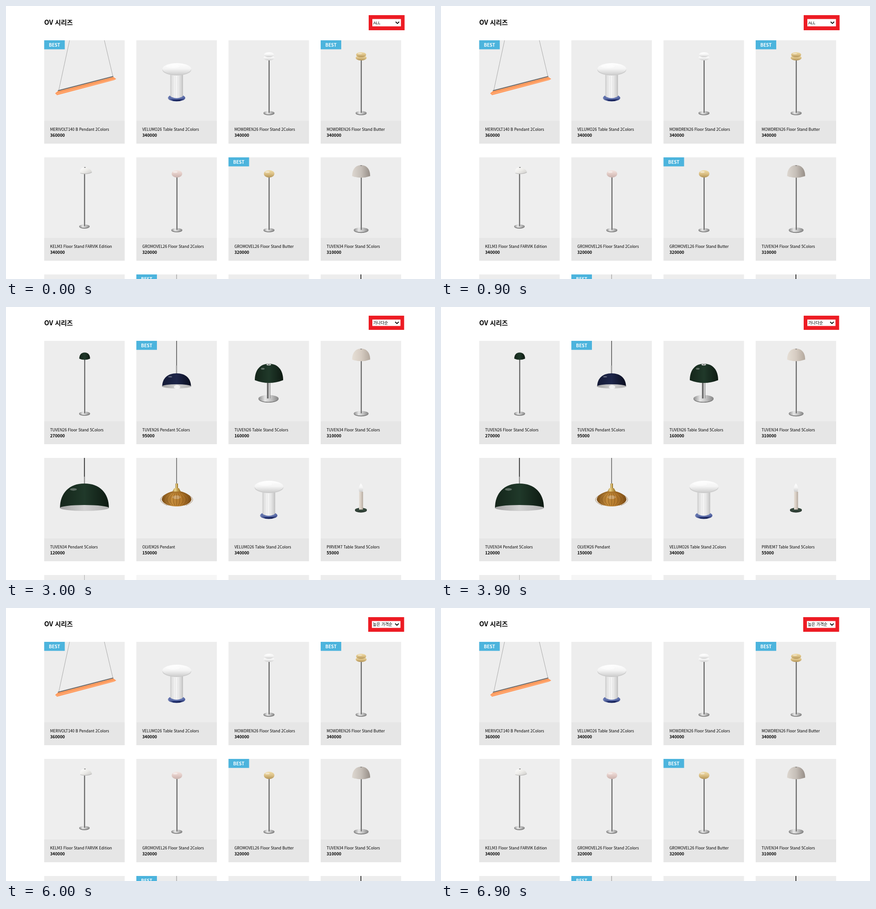
An HTML page that plays this animation: 938x597 px, repeating every 7.5 s.

```html
<!DOCTYPE html>
<html lang="ko">
<head>
<meta charset="utf-8">
<style>
html, body { margin: 0; width: 100%; height: 100%; overflow: hidden; background: #fff; }
svg { display: block; }
text { font-family: "Noto Sans CJK KR", "Noto Sans KR", "Noto Sans CJK", sans-serif; }
.title { font-size: 14.2px; font-weight: 700; }
.name { font-size: 8.45px; }
.price { font-size: 9.1px; font-weight: 700; }
.badge { font-size: 9.7px; font-weight: 700; fill: #fff; text-anchor: middle; }
.pick { font: 8.8px "Liberation Sans", "Noto Sans CJK KR", sans-serif; }
.tiny { font-size: 3px; fill: #555; }
</style>
</head>
<body>
<svg id="stage" width="938" height="597" viewBox="0 0 938 597"></svg>
<script>
// Gradients: direction (h, v, d for diagonal, r for radial) followed by evenly spaced stops
const grads = {
  white: 'v #ffffff #f4f4f4 #cfcfcf',
  butter: 'v #efdca8 #dcc186 #b39457',
  cream: 'v #f5e4b0 #e8d194 #c4a663',
  pink: 'v #f3e6e2 #e2cbc6 #cbb3ae',
  tube: 'h #cecece #ededed #f6f6f6 #e2e2e2 #bebebe',
  steel: 'h #dddddd #777777 #4a4a4a #b4b4b4',
  chrome: 'h #cccccc #444444 #ececec #777777',
  plate: 'h #8c8c8c #e6e6e6 #bdbdbd #858585',
  silver: 'h #a9a9a9 #ececec #c4c4c4 #e2e2e2 #a0a0a0',
  screw: 'h #6f6a64 #d4d0ca #8c867e #5a554f',
  brass: 'h #8f6c28 #ecd690 #bb9645 #856220',
  stone: 'h #ddd7d0 #c5beb7 #968e87',
  shell: 'h #e6dfd6 #d6ccc2 #b3a89d',
  green: 'h #14251a #20392a #0e1a12',
  navy: 'h #141a36 #1e264a #0a0e1f',
  ink: 'h #141d31 #222d44 #0a0f1b',
  blue: 'h #7d8cc0 #1d2c6b #141f56 #5b6cab',
  amber: 'h #7d4f18 #c48c3c #b57a2c #7a4b16',
  inside: 'h #a4a4a4 #d2d2d2 #b2b2b2',
  opal: 'd #ffffff #ecebe8 #c9c8c6',
  frost: 'd #fbfaf7 #f0eeea #d6d4d2',
  glow: 'r #dd9a4e #efc284 #f5e0be',
  wood: 'v #b39c82 #a08970 #8d775f',
  fade: 'd #fdfdfc #f3f3f4 #e4e4e8',
  warm: 'd #fdfdfc #f5f2ee #e8e4e2',
  shade: 'r #b9b9c0aa #c4c4ca55 #d0d0d400',
  ember: 'r #eec489aa #f1d5ac66 #f3e6d000'
};

const paint = c => grads[c] ? `url(#${c})` : c;
const E = (x, y, rx, ry, c, more = '') => `<ellipse cx="${x}" cy="${y}" rx="${rx}" ry="${ry}" fill="${paint(c)}" ${more}/>`;
const R = (x, y, w, h, c, more = '') => `<rect x="${x}" y="${y}" width="${w}" height="${h}" fill="${paint(c)}" ${more}/>`;
const P = (d, c, more = '') => `<path d="${d}" fill="${paint(c)}" ${more}/>`;
const L = (d, c, w = 1) => `<path d="${d}" fill="none" stroke="${c}" stroke-width="${w}"/>`;
const T = (x, y, cls, s) => `<text x="${x}" y="${y}" class="${cls}">${s}</text>`;
const each = (n, f) => Array.from({ length: n }, (_, i) => f(i)).join('');

function defs() {
  const ends = { h: 'x2="1" y2="0"', v: 'x2="0" y2="1"', d: 'x2="1" y2="1"', r: '' };
  return '<defs>' + Object.entries(grads).map(([id, spec]) => {
    const [dir, ...stops] = spec.split(' ');
    const tag = dir === 'r' ? 'radialGradient' : 'linearGradient';
    return `<${tag} id="${id}" ${ends[dir]}>` +
      stops.map((c, i) => `<stop offset="${i / (stops.length - 1)}" stop-color="${c}"/>`).join('') +
      `</${tag}>`;
  }).join('') + '</defs>';
}

// Lamp parts, in the coordinates of a 176 px picture
const cord = (len, c = '#222', w = 1.6) => R(88 - w / 2, 0, w, len, c);
const base = (y, rx, ry, x = 88) => E(x, y + 1, rx, ry, '#777') + E(x, y, rx, ry - .6, 'plate');
const pole = (top, rx = 12, bottom = 158.5, x = 88.5) =>
  base(bottom, rx, rx / 3 + .3, x) + R(x - 1.4, top, 3, bottom - top, 'steel');
const dome = (x, y, w, h, c, sag = 4) => P(
  `M${x - w} ${y + h}C${x - w} ${y + h * .38} ${x - w * .62} ${y} ${x} ${y}` +
  `C${x + w * .62} ${y} ${x + w} ${y + h * .38} ${x + w} ${y + h}Q${x} ${y + h + sag} ${x - w} ${y + h}Z`, c);
const shine = (x, y, rx, ry, o = .45) => E(x, y, rx, ry, '#fff', `opacity="${o}"`);
const pebbles = (x, y, rx, ry, gap, c) =>
  E(x, y + gap, rx * 1.08, ry, c) + E(x, y, rx, ry, c) + shine(x - rx * .25, y - ry * .4, rx * .45, ry * .25);
const screw = (x, y, w, h, c) => R(x, y, w, h, c, 'rx="2"') +
  each(4, i => L(`M${x} ${y + 3 + i * h / 4.5}l${w} 2`, '#574f45', 1)) +
  R(x + w * .3, y + h - 1, w * .4, 2.5, '#333', 'rx="1"');

const twinFloor = c => pole(44) + pebbles(88.5, 31.5, 11, 5.5, 7, c);
const ballFloor = c => pole(43) + E(88.8, 36, 11.5, 8, c) + shine(85, 32, 5, 2);
const domeFloor = c => pole(42, 16, 158.5, 88.5) + dome(88.5, 17, 19.7, 24, c, 7) + E(88.5, 18, 2, .8, '#777');
const pendant = (w, y, h, c, wire, cut) => cord(cut, wire) + R(86.8, cut, 2.6, y - cut + 1, 'chrome') +
  dome(88, y, w, h - 5, c, 3) + E(88, y + h - 5.5, w, w / 12 + 2, 'inside') + shine(88 - w * .45, y + h * .22, w * .14, w * .05, .3);

const art = {
  bar: () => L('M55.5 0L31.5 111M131.5 0L150.5 80', '#999', .8) +
    P('M24 116L30 111L151 80L157.5 84.5L153 87L28 120Z', '#ff9a5c') +
    L('M26 117.5L154 85', '#ffb98c', 1) + L('M30 110.3L151 79', '#6d6d6d', 2),
  mushroom: () => E(88, 126, 19, 7.5, 'blue') + E(88, 124, 17, 5.5, '#5f70ab') +
    P('M74 68V122Q88 131 102 122V68Z', 'tube') + each(6, i => L(`M${77 + i * 4.4} 78v47`, '#d9d9d9', .6)) +
    E(88.5, 64.5, 31.5, 12.5, '#cccccc') + E(88.5, 62.5, 31.5, 12.5, 'white') + shine(80, 57, 15, 4),
  twinWhite: () => twinFloor('white'),
  twinButter: () => twinFloor('butter'),
  beak: () => pole(35, 11.5, 150.5, 88) +
    P('M78.5 34C77 26 83 21 89 21.3C97 22 104 28 104.5 33Q98 37 89 36.5Q82 37 78.5 34Z', 'opal') +
    L('M79 34.5Q92 38 104 33', '#aaa', .8) + E(89, 22, 2, .9, '#888'),
  ballPink: () => ballFloor('pink'),
  ballButter: () => ballFloor('butter'),
  domeStone: () => domeFloor('stone'),
  domeShell: () => domeFloor('shell'),
  saucer: () => cord(33, '#999', 1.2) + R(86, 33, 4.2, 6, '#1a2868') + R(86.6, 38, 3, 40, '#22327a') +
    P('M29 98C55 94 68 90 74 81Q88 73 102 81C108 90 122 94 146 98Q130 106 88 106Q46 106 29 98Z', 'white') +
    L('M29 98Q46 106 88 106Q130 106 146 98', '#c4c4c4', .8) +
    E(88, 97, 23, 6, '#b8afa8') + E(88, 98, 15, 3.5, '#978d85') + R(82, 91, 12, 4, '#1d2c6b', 'rx="1"'),
  stack: () => R(71, 100, 5, 22, 'chrome') + R(58, 118, 76, 20, 'wood') + L('M58 119.5h76', '#c6b094', 2) +
    each(6, i => E(74, 98 - i * 9, 25 - i * .2, 6.5, '#5f5f5f') + E(74, 95 - i * 9, 26 - i * .3, 6, 'white')) +
    P('M50 52Q52 43 74 43Q96 43 98 52Q88 58 74 58Q60 58 50 52Z', 'white') +
    E(74, 48.5, 15, 4, '#555') + E(74, 50, 11, 2.5, '#ddd') + E(59, 45, 2, 2, '#999') + E(89, 45, 2, 2, '#999'),
  twinTable: () => base(127, 22.5, 7.5, 87.5) + R(87.5, 88, 5.5, 38, 'chrome') +
    P('M92 120L143 121.3L92 122.6Z', '#222') + pebbles(87.5, 60, 28, 13.5, 17, 'butter'),
  twinMini: () => E(88, 113, 17.5, 6.8, '#b9a478') + E(88, 111.5, 17.5, 6, '#e6d6b2') +
    R(83, 86, 10, 26, 'butter') + pebbles(87.5, 66, 20, 10, 13, 'white'),
  domeInk: () => pendant(30.5, 71, 34, 'ink', '#111', 56) + shine(89, 100, 7, 4, .7),
  domeNavy: () => pendant(31.5, 71, 34, 'navy', '#555', 54) + shine(89, 101, 7, 4, .7),
  greenFloor: () => pole(40, 12, 158.5, 88.3) + dome(88.5, 25.5, 11.8, 13.5, 'green', 5),
  greenTable: () => base(126, 22, 8, 87.5) + R(83.5, 88, 8, 38, 'chrome') +
    dome(88.5, 50, 31, 36, 'green', 12) + E(88, 52, 5, 1.8, '#ddd') + E(88, 52, 2, .8, '#444') + shine(75, 61, 4, 2, .3),
  greenBig: () => pendant(53.5, 56, 59, 'green', '#111', 41),
  glass: () => cord(57, '#666') + R(85.5, 56, 5.5, 10, 'brass') + P('M83 66h10l5 9h-20Z', 'brass') +
    P('M55.5 91C56 80 74 74.5 78 73.5H98C102 74.5 120 80 120.5 91C119 100 104 106 88 106C72 106 57 100 55.5 91Z', 'amber') +
    shine(88, 86, 9, 4, .3) +
    each(11, i => L(`M${88 + (i - 5) * 2} 74Q${88 + (i - 5) * 11} 90 ${88 + (i - 5) * 4} 104`, '#70440f', .6)),
  candle: () => E(88, 114.5, 13, 5, '#222f27') + E(88, 113.5, 13, 4.2, '#35463b') + R(84, 74, 8.6, 39, 'shell') +
    P('M84.5 74Q80.5 66 88 55.5Q95.5 66 91.5 74Z', 'white'),
  globe: () => E(108, 116, 54, 34, 'shade') + screw(77, 99, 17, 21, 'screw') +
    P('M74 92L78 103H94L99 92Z', '#dedcd9') + E(86, 74, 25, 24.5, 'frost') + shine(79, 64, 8, 7),
  long: () => E(88, 114, 54, 22, 'shade') + '<g transform="translate(56 107) rotate(-23)">' +
    P('M8 -7Q35 -9 55 -15Q82 -18 82 0Q82 16 55 14Q35 9 8 7Z', '#fff', 'fill-opacity=".5" stroke="#d3d3d3" stroke-width=".8"') +
    L('M10 0L28 -3L62 -6M28 3L64 5M28 -3L28 3', '#bbb', .8) + shine(58, -8, 16, 2.5) + '</g>' +
    '<g transform="translate(56 107) rotate(67)">' + screw(-8, -10, 16, 20, 'brass') + '</g>',
  diamond: () => E(98, 118, 62, 44, 'ember') + screw(80.5, 113, 16.5, 21, 'screw') +
    P('M69 52L88 47L109 51L123 76L97 116H81L54 76Z', 'glow', 'stroke="#e4c08c" stroke-width=".6"') +
    P('M69 52L88 47L109 51L100 62L77 62Z', '#fbeace', 'opacity=".7"') +
    L('M54 76L77 62L82 88L81 115M123 76L100 62L96 88L97 115M82 88H96', '#fbe8c8', .8) +
    L('M83 98L80 66L85 96L88 64L91 96L95 66L94 98', '#9a5c22', .8),
  book: () => R(35, 8, 109, 163, '#ececec') + R(34, 7, 108, 162, '#fff', 'stroke="#eee" stroke-width=".6"') +
    T(51, 21, 'tiny', '모루등불: 밤을 그리다') + T(90, 21, 'tiny', '40년 된 조명 회사는 어떻게') + T(90, 27, 'tiny', '이야기하게 되었을까') +
    base(147, 17, 5.5, 86) + R(84, 115, 6, 32, 'chrome') + pebbles(87, 96, 21.5, 10, 14, 'cream'),
  tray: () => L('M126 124L163 124', '#777', 1.2) + R(50, 110, 76, 24, 'wood') + P('M53 108H123L126 114H50Z', '#b7a188') +
    E(75, 114, 16, 5.5, '#8a745d') + E(75, 115.5, 13, 4, '#b39c82') + R(99, 87, 21, 29, 'brass') + E(109.5, 87, 10.5, 2.5, '#3a3226') +
    P('M102 86Q101 74 96 62Q91 38 109.5 37Q128 38 123 62Q118 74 117 86Z', '#fff', 'fill-opacity=".3" stroke="#999" stroke-width=".8"') +
    L('M107 84L105 56L110 60L114 56L112 84M109.5 38v-2', '#8f7d66', .7),
  post: () => L('M104 124L130 124', '#777', 1.2) + R(72, 113, 32.5, 22, 'wood') + R(72, 112, 32.5, 4, '#b7a188') +
    R(79, 66, 18.5, 52, 'silver') + E(88.2, 66, 9.2, 2, '#444') + E(88, 49, 16, 16, 'opal') + shine(83, 42, 6, 5),
  drop: () => cord(66, '#999', 1.2) + R(83, 65, 10, 30, 'tube') + R(84.5, 94.5, 7, 2.5, '#444') +
    P('M85 97Q84 102 81 108Q78 121 88 121.5Q98 121 95 108Q92 102 91 97Z', '#fff', 'fill-opacity=".3" stroke="#c0c0c0" stroke-width=".8"') +
    L('M87 98L85 112L88 109L91 112L89 98', '#bdb2a4', .6),
  wire: () => cord(60, '#111'),
  thin: () => cord(60, '#aaa', 1),
  none: () => ''
};

// art, name, price, best, picture background
const goods = {
  bar: ['bar', 'MERIVOLT140 B Pendant 2Colors', 360000, 1],
  mush: ['mushroom', 'VELUMO26 Table Stand 2Colors', 340000],
  twinW: ['twinWhite', 'MOWDREN26 Floor Stand 2Colors', 340000],
  twinB: ['twinButter', 'MOWDREN26 Floor Stand Butter', 340000, 1],
  beak: ['beak', 'KELM3 Floor Stand FARVIK Edition', 340000, 0, '#eeeeee'],
  ballP: ['ballPink', 'GROMOVEL26 Floor Stand 2Colors', 320000],
  ballB: ['ballButter', 'GROMOVEL26 Floor Stand Butter', 320000, 1],
  stone: ['domeStone', 'TUVEN34 Floor Stand 5Colors', 310000],
  shell: ['domeShell', 'TUVEN34 Floor Stand 5Colors', 310000],
  saucer: ['saucer', 'BRINU48 NIMBO Pendant 3Colors', 290000, 1],
  stack: ['stack', 'KELM Table Stand FARVIK Edition', 240000, 1],
  twinT: ['twinTable', 'MOWDREN26 Table Stand Butter', 220000, 1, '#e7e7ea'],
  mini: ['twinMini', 'MOWDREN17 Portable Stand 3Colors', 110000, 1, '#f0f0f0'],
  ink: ['domeInk', 'TUVEN26 Pendant 5Colors', 95000, 1],
  navy: ['domeNavy', 'TUVEN26 Pendant 5Colors', 95000, 1],
  greenF: ['greenFloor', 'TUVEN26 Floor Stand 5Colors', 270000],
  greenT: ['greenTable', 'TUVEN26 Table Stand 5Colors', 160000],
  greenP: ['greenBig', 'TUVEN34 Pendant 5Colors', 120000],
  glass: ['glass', 'OLVEM26 Pendant', 150000, 0, '#efefef'],
  candle: ['candle', 'PIRVEM7 Table Stand 5Colors', 55000],
  globe: ['globe', '누벨 VOM K75 Ivory (전구색, E26)', 4850, 0, 'fade'],
  long: ['long', '로미엔 VT58 (전구색, E26)', 6500, 0, 'fade'],
  diamond: ['diamond', 'T-VOR K135 (전구색, E26)', 13000, 0, 'warm'],
  book: ['book', '모루등불 : 밤을 그리다 (40년 된 조명 회...', 18000, 0, '#ffffff'],
  tray: ['tray', 'LARU4 Table Stand 2Colors', 55000],
  post: ['post', 'LARU5 Table Stand 3Colors', 55000],
  drop: ['drop', 'NIVO3.5 Pendant 4Colors', 60000],
  wire: ['wire', '', ''],
  wireBest: ['wire', '', '', 1],
  thin: ['thin', '', ''],
  pale: ['none', '', '', 0, '#f6f6f6'],
  dim: ['none', '', '', 0, '#e8e8e8'],
  none: ['none', '', '']
};

const byPrice = 'bar mush twinW twinB beak ballP ballB stone none saucer none wire';
// grid top, select box, option, goods, caption colour
const scenes = [
  [75, [793, 20, 78.5, 33], 'ALL', byPrice],
  [74, [793, 20, 77.5, 30], 'BEST 상품', 'bar twinB ballB saucer stack twinT mini ink wireBest'],
  [74, [793, 19, 77.5, 31], '가나다순', 'greenF navy greenT shell greenP glass mush candle thin pale none none'],
  [73, [794, 17, 76, 33], '낮은 가격순', 'globe long diamond book candle tray post drop none dim none dim', '#e9e6e2'],
  [74, [792, 20, 78.5, 32], '높은 가격순', byPrice]
];

function card(key, i, top, caption) {
  const [pic, name, price, best, bg = '#ededed'] = goods[key];
  const x = 83.5 + i % 4 * 201.5, y = top + Math.floor(i / 4) * 256;
  return `<g transform="translate(${x} ${y})">` + R(0, 0, 176, 176, bg) + R(0, 176, 176, 50, caption) + art[pic]() +
    T(13, 197.7, 'name', name) + T(13, 210.6, 'price', price) +
    (best ? R(0, 0, 45, 19.7, '#4cb4dd') + T(22.5, 13.5, 'badge', 'BEST') : '') + '</g>';
}

function scene([top, [x, y, w, h], option, keys, caption = '#e6e6e6']) {
  const mid = y + h / 2;
  return '<g>' + T(83.5, top - 33.8, 'title', 'OV 시리즈') +
    R(x, y, w, h, '#ed1c24') + R(x + 8, y + 8.5, w - 16, h - 17, '#fff') + T(x + 10, mid + 3.2, 'pick', option) +
    L(`M${x + w - 19.5} ${mid - 2}l3.8 3.8l3.8 -3.8`, '#000', 1.8) +
    keys.split(' ').map((k, i) => card(k, i, top, caption)).join('') + '</g>';
}

const stage = document.getElementById('stage');
stage.innerHTML = defs() + scenes.map(scene).join('');
const views = [...stage.querySelectorAll(':scope > g')];

function tick() {
  const now = Math.floor(performance.now() % 7500 / 1500);
  views.forEach((v, i) => v.style.display = i === now ? '' : 'none');
  requestAnimationFrame(tick);
}
tick();
</script>
</body>
</html>
```
